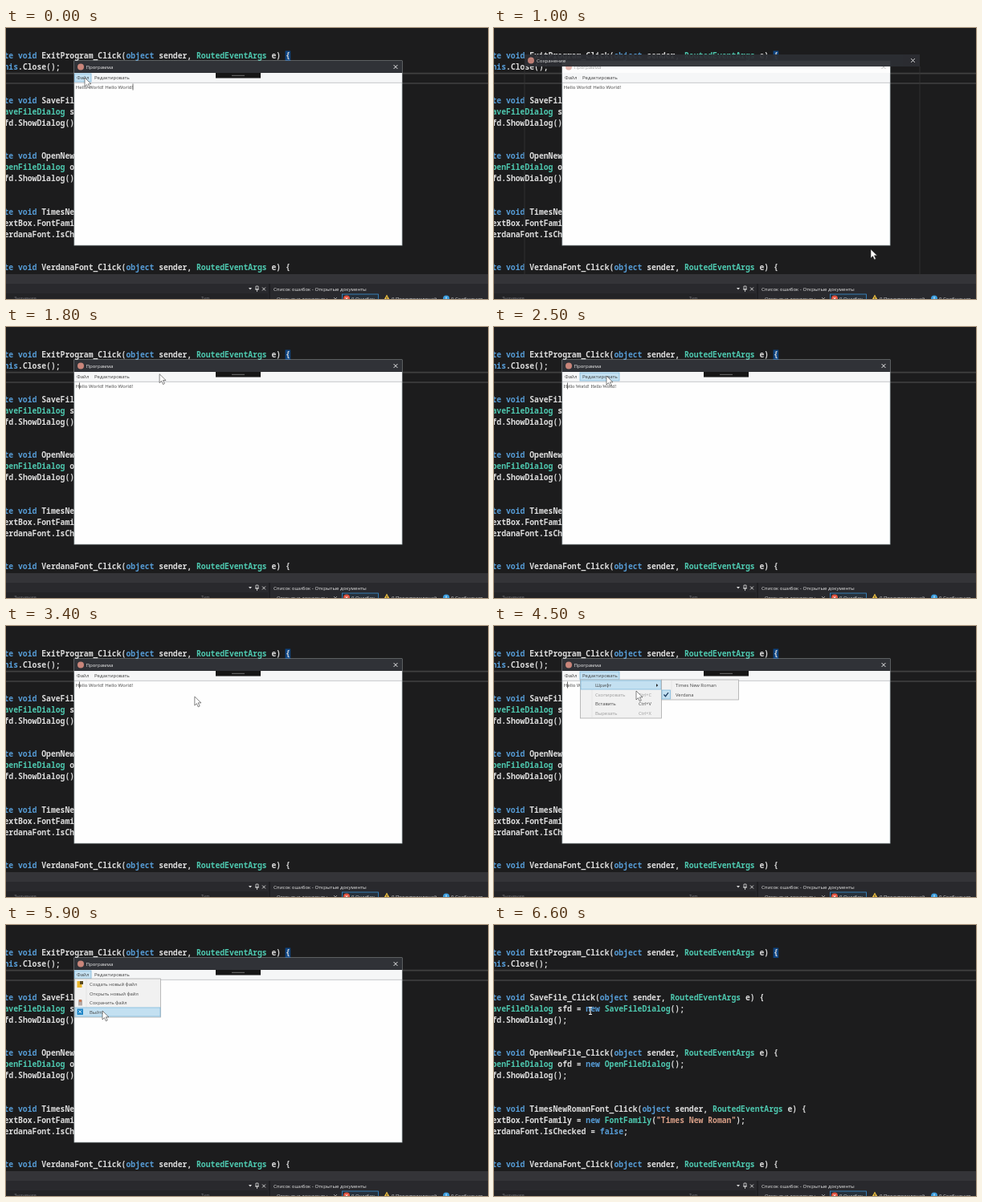
An HTML page that plays this animation: 600x338 px, repeating every 6700 ms.

```html
<!DOCTYPE html>
<html lang="ru">
<head>
<meta charset="utf-8">
<style>
html, body { margin: 0; width: 100%; height: 100%; overflow: hidden; background: #1c1c1d; }
svg { display: block; width: 100vw; height: 100vh; }
text { font-family: "Open Sans", "Noto Sans", sans-serif; white-space: pre; }
.code { font: 600 9.74px "Noto Sans Mono", "DejaVu Sans Mono", monospace; }
.serif { font-family: "Liberation Serif", serif; }
</style>
</head>
<body>
<svg id="stage" viewBox="0 0 600 338" preserveAspectRatio="none"></svg>
<script>
const LOOP = 6700, STEP = 100;

// Shape helpers; text is placed by its vertical centre.
const rect = (x, y, w, h, fill, stroke = 'none') =>
  `<rect x="${x}" y="${y}" width="${w}" height="${h}" fill="${fill}" stroke="${stroke}" stroke-width=".8"/>`;
const text = (x, y, s, fill = '#3c3c3c', size = 6, attrs = '') =>
  `<text x="${x}" y="${y + size * .36}" fill="${fill}" font-size="${size}" ${attrs}>${s}</text>`;
const path = (d, stroke, width = .8, fill = 'none') =>
  `<path d="${d}" stroke="${stroke}" stroke-width="${width}" fill="${fill}"/>`;
const dot = (x, y, r, fill) => `<circle cx="${x}" cy="${y}" r="${r}" fill="${fill}"/>`;
const cross = (x, y, r, color, width = .9) =>
  path(`M${x - r} ${y - r}l${2 * r} ${2 * r}m0 ${-2 * r}l${-2 * r} ${2 * r}`, color, width);
const chevron = (x, y, color = '#666') => path(`M${x - 2} ${y - 1}l2 2 2-2`, color, .7);
const within = (t, ...spans) => spans.some(([a, b]) => t >= a && t < b);

// Code editor behind the windows
const handler = name => `private void ${name}_Click(object sender, RoutedEventArgs e) {`;
const CODE = {
  0: handler('ExitProgram'),
  1: '    this.Close();',
  4: handler('SaveFile'),
  5: '    SaveFileDialog sfd = new SaveFileDialog();',
  6: '    sfd.ShowDialog();',
  9: handler('OpenNewFile'),
  10: '    OpenFileDialog ofd = new OpenFileDialog();',
  11: '    ofd.ShowDialog();',
  14: handler('TimesNewRomanFont'),
  15: '    textBox.FontFamily = new FontFamily("Times New Roman");',
  16: '    verdanaFont.IsChecked = false;',
  19: handler('VerdanaFont')
};
const TOKEN = /(".*?")|\b(private|void|object|new|this|false)\b|\b(RoutedEventArgs|(?:Save|Open)FileDialog|(?<=new )FontFamily)\b/g;
const paint = line => line.replace(TOKEN, (s, str, key) =>
  `<tspan fill="${str ? '#d69d85' : key ? '#569cd6' : '#4ec9b0'}">${s}</tspan>`);

function editor() {
  let s = rect(0, 0, 600, 338, '#1c1c1d') + rect(347.6, 28.5, 6.6, 12.5, '#0e4583') +
    path('M0 56.6H600M0 69H600', '#404041', 1.6);
  for (const row in CODE)
    s += `<text class="code" x="-31.7" y="${38 + 13.92 * row}" fill="#dcdcdc">${paint(CODE[row])}</text>`;
  s += rect(0, 307, 600, 12, '#343438') + rect(0, 319, 600, 19, '#29292d') +
    rect(0, 331, 326, 7, '#232326') + rect(327, 319, 2, 19, '#1f1f22');
  s += path('M302 324h4l-2 2.5z', 'none', 0, '#ddd') +
    path('M311 322h3v4h-3zM310 326h5M312.5 326v3', '#ddd', .8) + cross(321, 325.5, 2, '#ddd');
  s += text(333, 325.5, 'Список ошибок - Открытые документы', '#e6e6e6', 6.1);
  s += text(10, 336.5, 'Значение', '#77777c', 5.8) + text(243, 336.5, 'Тип', '#77777c', 5.8);
  s += text(337, 337.5, 'Открытые документы', '#cfcfcf') + chevron(410, 337, '#ccc');
  s += rect(418.5, 332, 45, 12, '#26303a', '#3a8fd0') + dot(424, 337.5, 4, '#e0503c') +
    cross(424, 337.5, 1.6, '#fff') + text(430, 337.5, '0 Ошибок', '#dcdcdc');
  s += path('M474 332.5l4.5 8h-9z', 'none', 0, '#f5c542') + path('M474 335v3', '#222') +
    text(480, 337.5, '0 Предупреждений', '#dcdcdc');
  return s + dot(548, 337.5, 4, '#3a9bdc') + path('M548 335v5', '#fff') +
    text(554, 337.5, '0 Сообщения', '#dcdcdc');
}

// Pointer path: time, x, y
const MOVES = [
  [0, 98, 62], [200, 98, 62], [600, 118, 95], [800, 122, 96], [1000, 469, 276],
  [1100, 480, 270], [1400, 521, 41], [1500, 521, 41], [1900, 130, 62], [2000, 140, 63],
  [2100, 160, 72], [2200, 240, 72], [2300, 250, 72], [2500, 140, 61], [2700, 140, 61],
  [2900, 160, 72], [3200, 245, 84], [3300, 245, 84], [3700, 180, 110], [4200, 130, 61],
  [4300, 135, 63], [4500, 177, 81], [4700, 177, 81], [4900, 170, 110], [5200, 95, 61],
  [5300, 96, 62], [5400, 120, 72], [5500, 120, 72], [5700, 96, 61], [5800, 98, 63],
  [5900, 120, 107], [LOOP, 120, 107]
];
function pointer(t) {
  const i = MOVES.findIndex(m => m[0] > t);
  const [t0, x0, y0] = MOVES[i - 1], [t1, x1, y1] = MOVES[i];
  const u = (t - t0) / (t1 - t0), k = u * u * (3 - 2 * u);
  return [x0 + (x1 - x0) * k, y0 + (y1 - y0) * k];
}
function cursor(t, [x, y]) {
  if (t >= 6100)
    return path(`M${x - 2} ${y - 4.5}h4M${x} ${y - 4.5}v9M${x - 2} ${y + 4.5}h4`, '#eee', 1.1);
  return path(`M${x} ${y}v11l2.5-2.4 1.9 4.2 1.9-.9-1.9-4.1h3.6z`, '#333', .6, '#fff');
}

// Menus
const ROW = 11.5, rowY = i => 74 + ROW * i;
const hoverRow = y => Math.max(0, Math.min(3, Math.floor((y - 68) / ROW)));
const glow = (x, y, w, h) => rect(x, y, w, h, '#c3e0f1', '#7fb9dc');
const panel = (x, w, h) => rect(x, 67, w, h, '#f1f1f1', '#aaa');

function fileMenu(y) {
  let s = panel(85.5, 107, 48) + path('M100 68v46', '#ddd', .6) +
    glow(86, 68.5 + ROW * hoverRow(y), 106, 11);
  ['Создать новый файл', 'Открыть новый файл', 'Сохранить файл', 'Выйти']
    .forEach((label, i) => s += text(104, rowY(i), label, '#444', 5.85));
  return s + rect(88.5, 70, 6, 8, '#e8b52c') + rect(92, 70, 4, 4, '#5a4a20') +
    rect(90, 93.5, 5, 7, '#b5aaa6') + rect(91, 93, 3, 3, '#c77a55') +
    rect(88.5, 104.5, 7.5, 7.5, '#1f86c8') + cross(92.2, 108.2, 1.7, '#fff');
}
function editMenu(t, [x], sub) {
  let s = panel(107.5, 101, 48) + path('M122 68v46', '#ddd', .6) + glow(108, 68, 100, 11);
  [['Шрифт', ''], ['Скопировать', 'Ctrl+C'], ['Вставить', 'Ctrl+V'], ['Вырезать', 'Ctrl+X']]
    .forEach(([label, key], i) => {
      const color = i % 2 ? '#9a9a9a' : '#444';
      s += text(126, rowY(i), label, color, 5.85) + text(180, rowY(i), key, color, 5.7);
    });
  s += path('M202 72l2.2 2-2.2 2z', 'none', 0, '#222');
  if (!sub) return s;
  const checked = within(t, [2300, 3300]) ? 0 : 1;
  s += panel(208.5, 96, 25) + path('M221 68v23', '#ddd', .6);
  if (x > 210) s += glow(209, t < 2700 ? 68 : 80, 95, 11);
  const y = rowY(checked);
  return s + glow(209, y - 5.5, 10.5, 11) + path(`M211.5 ${y}l2 2.2 3.5-4.5`, '#17365a', 1.2) +
    text(226, rowY(0), 'Times New Roman', '#444', 5.85) + text(226, rowY(1), 'Verdana', '#444', 5.85);
}

// Text editor window
function app(t, at) {
  const [x, y] = at, active = !within(t, [900, 1500]);
  const fileOpen = within(t, [200, 800], [5300, 5500], [5800, 6000]);
  const editOpen = within(t, [2000, 2300], [2700, 3300], [4300, 4700]);
  const subOpen = within(t, [2100, 2300], [2900, 3300], [4400, 4700]);
  const onBar = active && y >= 57 && y < 67;
  let s = rect(85, 41, 408, 230, '#fefefe', '#b9c4c6') +
    rect(85, 41, 408, 15, active ? '#303237' : '#fdfdfd') +
    dot(93, 48.5, 4, active ? '#c9857a' : '#e3b4ac') +
    text(99.5, 48.7, 'Программа', active ? '#f0f0f0' : '#999', 6.1) +
    cross(485, 48.5, 2.4, active ? '#fff' : '#aaa') +
    rect(85.4, 56, 407.2, 11.5, '#f5f6f7') + path('M85 68.3H493', '#b4b8bc', .8);
  if (fileOpen || onBar && x < 106) s += glow(85.5, 57, 20.5, 10);
  if (editOpen || onBar && x >= 106 && x < 157) s += glow(107, 57, 49, 10);
  s += text(88, 62, 'Файл') + text(110, 62, 'Редактировать');
  if (active) s += rect(261, 56, 56, 6.5, '#161616') + path('M281 59.3h16', '#888', .8);
  if (t < 5500) {
    const serif = within(t, [2300, 3300]);
    s += text(86.8, 73.5, 'Hello World! Hello World!', '#444', 6.1, serif ? 'class="serif"' : '');
    const caret = t < 900 ? 158 : 91.5;
    if (active) s += path(`M${caret} 69.5v8`, '#333', .7);
  }
  if (fileOpen) s += fileMenu(y);
  if (editOpen) s += editMenu(t, at, subOpen);
  return s;
}

// Save dialog
const PLACES = ['Этот компьютер', 'Видео', 'Документы', 'Загрузки', 'Изображения', 'Музыка',
  'Объемные объ', 'Рабочий стол', 'DISK C (C:)', 'DISK E (D:)', 'DISK D (E:)', 'CD-дисковод (F'];
const FOLDERS = `Ombra|09.01.2018 17:14
Sky Rambler|16.09.2018 21:48
Nelo CollaborationFolder|08.01.2019 21:35
VeltoCord|19.01.2018 11:34
Planer Room|09.08.2018 19:06
oR Sender|30.01.2019 18:33
KeyrolReserve|19.10.2018 20:30
Fax|15.05.2017 20:00
OpinionDesk|15.05.2018 23:15
Page Clerk Studio 3|29.04.2017 15:53
Codec Workshop Output|04.06.2018 23:40
PostRinser|08.01.2019 12:11
My ISO Files|29.04.2017 15:35
Two Shelf|29.04.2017 15:33`.split('\n').map(line => line.split('|'));

function dialogTitle(fill, hot) {
  return rect(38, 33, 492, 15, fill) + dot(46, 40.5, 4, '#c9857a') +
    text(53, 40.7, 'Сохранение', '#ededed', 6.1) +
    (hot ? rect(513, 33, 17, 14.5, '#c43a38') : '') + cross(521.5, 40.5, 2.3, '#fff');
}
function dialog(hot) {
  let s = rect(38, 33, 492, 276.5, '#fefefe') + dialogTitle('#625f61', hot);
  // Address row
  s += path('M54 57.5h-6m2.5-2.5l-2.5 2.5 2.5 2.5M61 57.5h6m-2.5-2.5l2.5 2.5-2.5 2.5', '#d6d6d6') +
    chevron(75, 57.5, '#bbb') + path('M86 61v-7m-2.5 2.5l2.5-2.5 2.5 2.5', '#555') +
    rect(93, 52, 319, 11, '#fff', '#e2e2e2') + rect(97, 53.5, 5.5, 7, '#a9c6da') +
    path('M107 55.5l2 2-2 2M166 55.5l2 2-2 2M213 55.5l2 2-2 2', '#666', .7) +
    text(114, 57.5, 'Этот компьютер') + text(174, 57.5, 'Документы') + chevron(396, 57.5) +
    path('M409 55.8a2.5 2.5 0 1 0 .4 2', '#777', .8) +
    rect(416, 52, 108, 11, '#fff', '#e2e2e2') + text(423, 57.5, 'Поиск: Документы', '#666', 5.9) +
    path('M514.5 60l2.2-2.2a2 2 0 1 1 .1.1', '#555', .8);
  // Toolbar
  s += rect(38, 67, 492, 14.5, '#f7f8f9') + text(47, 74.5, 'Упорядочить') + chevron(90, 74.5) +
    text(108, 74.5, 'Новая папка') + path('M481 72.5h8M481 74.5h8M481 76.5h8', '#bbb', .8) +
    chevron(497, 74.5) + dot(518, 74.5, 4.3, '#1c75bc') + text(516.6, 74.5, '?', '#fff', 6);
  // Places
  s += rect(38, 112.5, 73.4, 12, '#d9d9d9');
  PLACES.forEach((name, i) => {
    const y = 93 + 12.5 * i;
    s += rect(i ? 55 : 51, y - 2.5, 7, 5, i < 8 ? '#5d9fc7' : '#8b969c') +
      text(i ? 66 : 62, y, name, '#444', 5.9);
  });
  s += rect(51, 244.5, 7, 5, '#5d9fc7') + text(62, 247, 'Сеть', '#444', 5.9);
  s += rect(111.5, 82, 7.5, 168, '#f3f3f3') + rect(112, 146, 6.5, 84, '#cdcdcd') +
    path('M113 87l2.2-2 2.2 2', '#777', .7) + chevron(115.2, 246);
  // Folder list
  [[130, 'Имя'], [267, 'Дата изменения'], [328, 'Тип'], [391, 'Размер']]
    .forEach(([x, label]) => s += text(x, 90, label, '#626b78', 5.8));
  s += path('M199 85l2-1.6 2 1.6', '#888', .6);
  FOLDERS.forEach(([name, date], i) => {
    const y = 104.7 + 10.95 * i;
    s += rect(131, y - 3, 7.5, 6.5, '#f3d27c') + rect(131, y - 3.8, 3.5, 2, '#e3b652') +
      text(141, y, name, '#444', 5.8) + text(267, y, date, '#666', 5.65) +
      text(328, y, 'Папка с файлами', '#666', 5.9);
  });
  s += rect(522.5, 82, 7.5, 168, '#f3f3f3') + rect(523, 91, 6.5, 55, '#cdcdcd') +
    path('M524 87l2.2-2 2.2 2', '#777', .7) + chevron(526.2, 246);
  // Name, type and buttons
  s += rect(38, 250, 492, 59.5, '#f0f0f0') +
    text(102, 260.5, 'Имя файла:', '#444', 6, 'text-anchor="end"') +
    text(102, 273.5, 'Тип файла:', '#444', 6, 'text-anchor="end"') +
    rect(104, 254.5, 422.5, 12, '#fff', '#6fb0df') + path('M106.5 256.5v8', '#333', .7) +
    rect(104, 268.5, 422.5, 10.5, '#e4e4e4', '#c6c6c6') + chevron(522, 260.5) + chevron(522, 273.5);
  s += path('M45 299.5l2-2 2 2', '#555') + text(54, 298, 'Скрыть папки') +
    rect(419, 291, 49, 12, '#e1e1e1', '#3f90d4') + rect(476, 291, 45, 12, '#e1e1e1', '#bdbdbd');
  return s + text(443.5, 297, 'Сохранить', '#333', 6, 'text-anchor="middle"') +
    text(498.5, 297, 'Отмена', '#333', 6, 'text-anchor="middle"');
}

const backdrop = editor();
function scene(t) {
  const at = pointer(t);
  let s = backdrop;
  if (t < 6000) s += app(t, at);
  if (within(t, [1000, 1100]))
    s += `<g opacity=".94">${dialogTitle('#2c2e33', false)}</g>` +
      path('M38 48V311M530 48V311', '#353536', .8);
  if (within(t, [1100, 1500])) s += dialog(at[0] > 513 && at[1] < 48);
  return s + cursor(t, at);
}

const stage = document.getElementById('stage');
let shown = -1;
function tick(now) {
  const t = Math.floor(now % LOOP / STEP) * STEP;
  if (t !== shown) stage.innerHTML = scene(shown = t);
  requestAnimationFrame(tick);
}
tick(performance.now());
</script>
</body>
</html>
```
